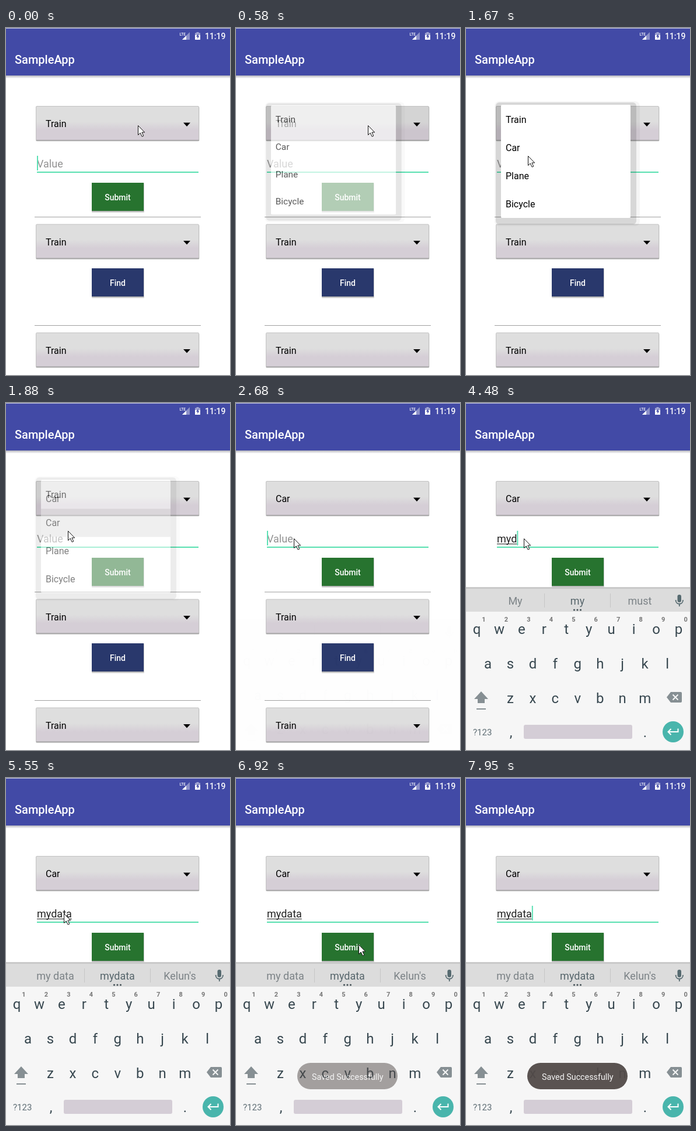
Write an HTML page that moves like this. It is 384 by 592 pixels and loops after 8000 ms.

```html
<!DOCTYPE html>
<html lang="en">
<head>
<meta charset="utf-8">
<title>Form demo</title>
<style>
html, body { margin: 0; width: 100%; height: 100%; overflow: hidden; background: #fff; }
svg { display: block; font-family: Roboto, sans-serif; font-size: 16px; }
.bold { font-weight: 500; }
.mid { text-anchor: middle; }
.key { font-size: 24px; fill: #37474f; text-anchor: middle; }
.digit { font-size: 11px; font-weight: 700; fill: #757575; text-anchor: middle; }
.field { font-size: 18px; }
.label { font-size: 14px; font-weight: 500; fill: #fff; text-anchor: middle; }
</style>
</head>
<body>
<svg width="384" height="592" viewBox="0 0 384 592">
  <defs>
    <linearGradient id="face" x2="0" y2="1">
      <stop offset=".45" stop-color="#dedede"/><stop offset=".7" stop-color="#d5ced6"/>
    </linearGradient>
    <linearGradient id="drop" x2="0" y2="1">
      <stop stop-color="#b4b4bb"/><stop offset="1" stop-color="#fff"/>
    </linearGradient>
    <g id="spinner">
      <rect x="51" y="134" width="280.5" height="59.5" rx="2" fill="#d2d2d2"/>
      <rect x="51.5" y="133.5" width="279" height="58.5" rx="1.5" fill="url(#face)" stroke="#c2c2c2"/>
      <path d="M52 191.5H331" stroke="#929292"/>
      <path d="M304 161.5H316L310 168Z"/>
    </g>
    <g id="button">
      <rect x="147" y="265" width="90" height="50" rx="1" fill="#ddd"/>
      <rect x="147" y="264" width="89.5" height="49.5" rx="1" fill="#b0b0b0"/>
      <rect x="147" y="264" width="89" height="48"/>
    </g>
  </defs>

  <rect width="384" height="592" fill="#fff"/>
  <rect width="384" height="1" fill="#c5c8e4"/>
  <rect y="1" width="384" height="80" fill="#424aa6"/>
  <rect y="81" width="384" height="5" fill="url(#drop)"/>
  <g fill="#fff">
    <text class="bold" x="15" y="61" font-size="20">SampleApp</text>
    <text class="bold" x="376.5" y="19" font-size="14" text-anchor="end">11:19</text>
    <text class="bold" x="297.5" y="12.5" font-size="6.5">LTE</text>
    <path d="M315 7V20H302Z" opacity=".4"/>
    <path d="M309 13V20H302Z"/>
    <path d="M326.5 7H330.5V8.5H333V13H324V8.5H326.5Z" opacity=".5"/>
    <path d="M324 12H333V20H324Z"/>
    <path d="M329.5 9.5L326 14.8H328.2V18.5L331.3 13.4H329.5Z" fill="#424aa6"/>
  </g>

  <use href="#spinner"/>
  <rect id="press" x="52" y="134" width="279" height="58" fill="#000"/>
  <text id="choice" x="68" y="169"></text>
  <use href="#spinner" y="201.5"/>
  <text x="68" y="370.5">Train</text>
  <use href="#spinner" y="386.5"/>
  <text x="68" y="555.5">Train</text>
  <path d="M49 322.5H334M49 507.5H334" stroke="#a0a0a0"/>

  <rect x="53" y="245" width="277" height="2" fill="#58e0b0"/>
  <text id="hint" class="field" x="53" y="238" fill="#939393">Value</text>
  <text id="typed" class="field" x="53" y="238" fill="#222"></text>
  <rect id="underline" x="53" y="240" height="1" fill="#222"/>
  <rect id="caret" y="218" width="2" height="25" fill="#5ce0b4"/>

  <use href="#button" fill="#27732f"/>
  <rect id="flash" x="147" y="264" width="89" height="48" fill="#fff"/>
  <text class="label" x="191.5" y="293.5">Submit</text>
  <use href="#button" y="146" fill="#29386c"/>
  <text class="label" x="191.5" y="439.5">Find</text>

  <g id="popup">
    <rect x="49" y="125" width="249" height="213" rx="8" opacity=".04"/>
    <rect x="51" y="127" width="241" height="208" rx="6" opacity=".12"/>
    <rect x="60" y="131" width="222" height="193" rx="2" fill="#fff"/>
    <rect id="row" x="60" y="180.5" width="222" height="48" fill="#000"/>
    <text x="68" y="161.5">Train</text>
    <text x="68" y="209.5">Car</text>
    <text x="68" y="258">Plane</text>
    <text x="68" y="306">Bicycle</text>
  </g>

  <g id="board">
    <rect y="314" width="384" height="3" fill="#c9c9c9"/>
    <rect y="317" width="384" height="39" fill="#dcdcdc"/>
    <rect y="356" width="384" height="300" fill="#f6f6f6"/>
    <path d="M134.5 325V349M247.5 325V349" stroke="#c6c6c6"/>
    <g id="words" class="field mid" fill="#7b8286">
      <text x="84.5" y="344"></text>
      <text x="191" y="344" fill="#56656b"></text>
      <text x="298" y="344"></text>
    </g>
    <g id="dots" fill="#455157">
      <circle cx="185.5" cy="353" r="1.6"/><circle cx="191" cy="353" r="1.6"/><circle cx="196.5" cy="353" r="1.6"/>
    </g>
    <rect x="362.5" y="327" width="6.5" height="13" rx="3.2" fill="#566a70"/>
    <path d="M359.5 336C359.5 345 372 345 372 336M365.8 342.5V347" fill="none" stroke="#566a70" stroke-width="1.8"/>
    <g fill="#868f93">
      <path d="M26 492L38 505H32V512H20V505H14ZM18 521H34V523H18Z"/>
      <path d="M344 502L351 493H368Q370 493 370 495V509Q370 511 368 511H351Z"/>
    </g>
    <path d="M354.5 497.5L363.5 506.5M363.5 497.5L354.5 506.5" stroke="#f6f6f6" stroke-width="2"/>
    <text x="12" y="566.5" font-size="15" fill="#5f6e75">?123</text>
    <text class="key" x="77" y="570">,</text>
    <text class="key" x="307" y="570">.</text>
    <rect x="99" y="549" width="186" height="24" rx="3" fill="#d4cdd6"/>
    <circle cx="355" cy="561" r="18" fill="#49b5ac"/>
    <path d="M363.5 555.5V561H347M351.5 556L346.5 561L351.5 566" fill="none" stroke="#fff" stroke-width="2"/>
  </g>

  <g id="toast">
    <rect x="105" y="486" width="172" height="45" rx="22.5" fill="#514a48" opacity=".94"/>
    <text class="mid" x="191.3" y="514.5" font-size="14.3" fill="#f4f4f4">Saved Successfully</text>
  </g>
  <path id="mouse" d="M.5 .5V16.5L4.2 13L7.2 19.2L9.8 18L6.9 12H11.7Z" fill="#fff" stroke="#111"/>
</svg>
<script>
const $ = id => document.getElementById(id);
const show = (id, alpha) => $(id).setAttribute('opacity', +alpha);
const ramp = (t, a, b) => Math.min(1, Math.max(0, (t - a) / (b - a)));
const easeOut = (p, n = 2) => 1 - (1 - p) ** n;
const smooth = p => p * p * (3 - 2 * p);
const last = (list, t) => list.filter(item => item[0] <= t).pop();

function addKey(cls, x, y, char) {
  const el = document.createElementNS('http://www.w3.org/2000/svg', 'text');
  el.setAttribute('class', cls);
  el.setAttribute('x', x);
  el.setAttribute('y', y);
  el.textContent = char;
  $('board').append(el);
}
[['qwertyuiop', 18.5, 394], ['asdfghjkl', 37.5, 453], ['zxcvbnm', 76, 511.5]].forEach(([row, x, y]) =>
  [...row].forEach((c, i) => addKey('key', x + i * 38.45, y, c)));
[...'1234567890'].forEach((c, i) => addKey('digit', 30.5 + i * 38.45, 373, c));

// start, end, then the point reached
const moves = [
  [890, 1310, 106, 218], [2130, 2220, 99, 231], [5550, 6010, 210, 284],
  [7450, 7760, 121, 570], [7920, 7940, 110, 592]
];
const keystrokes = [3880, 4100, 4480, 4650, 4860, 5010];
const suggestions = [
  [0, '', '', ''],
  [3960, 'my', 'm', 'must'],
  [4180, 'My', 'my', 'must'],
  [4550, 'my d', 'myd', 'mud'],
  [4700, 'my da', 'myda', 'Kelun'],
  [4930, 'my dat', 'mydat', "Kelun's"],
  [5050, 'my data', 'mydata', "Kelun's"]
];
const blinks = [
  [0, 1], [230, 0], [2170, 1], [3150, 0], [3650, 1], [5550, 0],
  [6010, 1], [6510, 0], [7010, 1], [7490, 0], [7950, 1]
];

function draw(t) {
  let x = 226, y = 166;
  for (const [start, end, toX, toY] of moves) {
    const p = smooth(ramp(t, start, end));
    x += (toX - x) * p;
    y += (toY - y) * p;
  }
  $('mouse').setAttribute('transform', `translate(${x} ${y})`);
  show('mouse', t < 7940);

  const open = easeOut(ramp(t, 480, 730));
  const size = .9 + .1 * open;
  show('popup', open * (1 - ramp(t, 1790, 1970)));
  $('popup').setAttribute('transform', `translate(60 160) scale(${size}) translate(-60 -160)`);
  show('press', .08 * ramp(t, 390, 450) * (1 - ramp(t, 500, 680)));
  show('row', .12 * ramp(t, 1670, 1760));
  $('choice').textContent = t < 1790 ? 'Train' : 'Car';

  const rise = ramp(t, 2680, 2890);
  show('board', ramp(t, 2680, 2800));
  $('board').setAttribute('transform', `translate(0 ${55 * (1 - easeOut(rise, 4))})`);

  const count = keystrokes.filter(k => k <= t).length;
  $('typed').textContent = 'mydata'.slice(0, count);
  const width = count ? $('typed').getComputedTextLength() : 0;
  $('underline').setAttribute('width', width);
  $('caret').setAttribute('x', 53 + width);
  show('caret', last(blinks, t)[1]);
  show('hint', !count);
  const words = last(suggestions, t);
  [...$('words').children].forEach((el, i) => el.textContent = words[i + 1]);
  show('dots', words[2] !== '');

  show('flash', .12 * ramp(t, 6760, 6790) * (1 - ramp(t, 6810, 6910)));
  show('toast', easeOut(ramp(t, 6780, 7220)));
}

const begin = performance.now();
function tick() {
  draw((performance.now() - begin) % 8000);
  requestAnimationFrame(tick);
}
tick();
</script>
</body>
</html>
```
